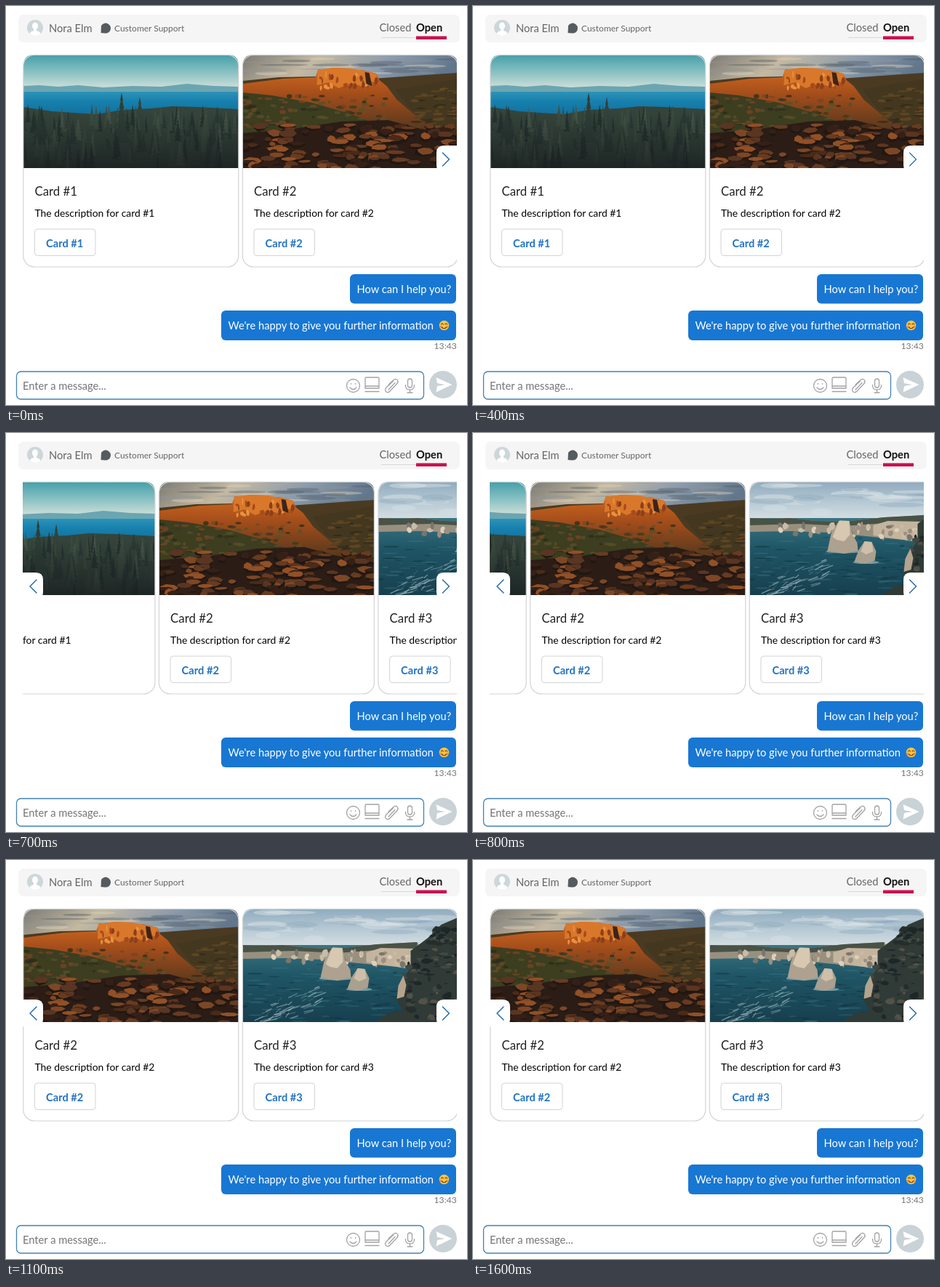
An HTML page that plays this animation: 634 px wide and 549 px high, repeating every 1700 ms.

```html
<!DOCTYPE html>
<html lang="en">
<head>
<meta charset="utf-8">
<title>Chat carousel</title>
<style>
  html, body { margin: 0; width: 100%; height: 100%; overflow: hidden; background: #fff; }
  svg { display: block; width: 634px; height: 549px; font: 14.7px Lato, sans-serif; }
  .line { fill: none; stroke-linecap: round; stroke-linejoin: round; }
  .icons { stroke: #a3a3a3; stroke-width: 1.3; }
  .bold { font-weight: 700; }
</style>
</head>
<body>
<svg viewBox="0 0 634 549">
  <defs>
    <clipPath id="view"><rect x="23" y="60" width="597" height="305"/></clipPath>
    <clipPath id="photo"><path d="M0 156V15Q0 0 15 0H281Q296 0 296 15V156Z"/></clipPath>
    <clipPath id="face"><circle cx="40" cy="30" r="11"/></clipPath>
    <linearGradient id="sky1" x2="0" y2="1"><stop stop-color="#459fa9"/><stop offset=".55" stop-color="#8cc3c4"/><stop offset="1" stop-color="#cfdfd8"/></linearGradient>
    <linearGradient id="lake" x2="0" y2="1"><stop stop-color="#2c93b8"/><stop offset=".4" stop-color="#1780ad"/><stop offset="1" stop-color="#126f9b"/></linearGradient>
    <linearGradient id="shade" x2="0" y2="1"><stop stop-color="#161d1e" stop-opacity="0"/><stop offset="1" stop-color="#161b1d" stop-opacity=".75"/></linearGradient>
    <linearGradient id="sky2" x2="1" y2=".2"><stop stop-color="#7b7972"/><stop offset=".35" stop-color="#c4b9a2"/><stop offset=".7" stop-color="#8a9aab"/><stop offset="1" stop-color="#62778c"/></linearGradient>
    <linearGradient id="mesa" x2="0" y2="1"><stop stop-color="#d0691f"/><stop offset=".4" stop-color="#a34d1b"/><stop offset="1" stop-color="#4c351d"/></linearGradient>
    <linearGradient id="sky3" x2="0" y2="1"><stop stop-color="#8fabbf"/><stop offset=".6" stop-color="#bccdd7"/><stop offset="1" stop-color="#d9e1e3"/></linearGradient>
    <linearGradient id="sea" x2="0" y2="1"><stop stop-color="#3a7583"/><stop offset=".4" stop-color="#1f5565"/><stop offset="1" stop-color="#173f4e"/></linearGradient>
  </defs>

  <rect x="17" y="12" width="607" height="38" rx="7" fill="#f5f5f5"/>
  <circle cx="40" cy="30" r="11" fill="#cdd7da"/>
  <g fill="#fff" clip-path="url(#face)"><ellipse cx="40" cy="27.5" rx="4" ry="5"/><path d="M31 42Q32 35 38 34V30H42V34Q48 35 49 42Z"/></g>
  <text x="59" y="36" fill="#666">Nora Elm</text>
  <path d="M130.500 37L131 27A7 7 0 1 1 136 37.500Z" fill="#555b5e"/>
  <text x="149" y="35" font-size="12" fill="#666">Customer Support</text>
  <text x="513.500" y="35" fill="#666">Closed</text>
  <path d="M516 43.500H564" stroke="#d8d8d8"/>
  <text class="bold" x="564" y="34.500" fill="#111">Open</text>
  <rect x="564" y="41.500" width="42" height="4.500" fill="#c9114d"/>

  <g clip-path="url(#view)">
    <g id="strip"></g>
    <g id="prev">
      <path d="M22 192H41Q51 192 51 202V219Q51 229 41 229H22Z" fill="#fff"/>
      <path class="line" d="M42 202L33 211L42 220" stroke="#286ca8" stroke-width="1.5"/>
    </g>
    <path d="M621 192H602Q592 192 592 202V219Q592 229 602 229H621Z" fill="#fff"/>
    <path id="next" class="line" d="M600.500 202L609.500 211L600.500 220" stroke="#286ca8"/>
  </g>

  <g fill="#1877d2"><rect x="473" y="369" width="146" height="40.500" rx="6"/><rect x="296" y="419" width="323" height="41" rx="6"/></g>
  <g fill="#fff"><text x="482.500" y="395">How can I help you?</text><text x="305.500" y="445">We're happy to give you further information</text></g>
  <circle cx="602.500" cy="439.500" r="6.800" fill="#f8c440"/>
  <g fill="#ee8a55"><circle cx="598" cy="441.500" r="1.800"/><circle cx="607" cy="441.500" r="1.800"/></g>
  <path class="line" d="M598.500 438Q600 435.500 601.300 438M604 438Q605.500 435.500 606.800 438M599.500 442Q602.500 445.500 605.500 442" stroke="#70401d" stroke-width="1.200"/>
  <text x="588.500" y="472" font-size="12.200" fill="#777">13:43</text>

  <rect x="14.500" y="503" width="560" height="38" rx="6" fill="#fff" stroke="#4382b4" stroke-width="1.300"/>
  <text x="23" y="527.500" fill="#757575">Enter a message...</text>
  <g class="line icons">
    <circle cx="477.500" cy="522.500" r="9"/>
    <path d="M474.500 519.500v.8M480.500 519.500v.8M473 525Q477.500 530 482 525"/>
    <path d="M495.500 511H511.500Q513 511 513 512.500V526H494V512.500Q494 511 495.500 511ZM494 523H513M494 530.500H513"/>
    <path d="M526 521L533 514.500Q536.500 512 538.500 515Q540 517.500 537.500 520L528 530Q525 533 522.500 530.500Q520.500 528 523 525L532.500 516M526 528L535 518.500"/>
    <rect x="552.500" y="513" width="6" height="12" rx="3"/>
    <path d="M549.500 521.500V523Q550 528 555.500 528Q561 528 561.500 523V521.500M555.500 528V532M552 532H559"/>
  </g>
  <circle cx="601" cy="521" r="19" fill="#c9d2d6"/>
  <path d="M591.500 511L613.500 521L591.500 531.500L593 523L604 521L593 519Z" fill="#fff"/>
</svg>
<script>
let seed = 11;
const rand = (min, max) => {
  seed = seed * 16807 % 2147483647;
  return min + (max - min) * seed / 2147483647;
};
const pick = list => list[Math.floor(rand(0, list.length))];
const repeat = (n, make) => Array.from({ length: n }, (_, i) => make(i)).join('');
const poly = (points, fill, more = '') => `<polygon points="${points}" fill="${fill}" ${more}/>`;
const box = (y, h, fill) => `<rect y="${y}" width="296" height="${h}" fill="${fill}"/>`;
const blob = (x, y, rx, ry, fill, opacity) =>
  `<ellipse cx="${x}" cy="${y}" rx="${rx}" ry="${ry}" fill="${fill}" opacity="${opacity}"/>`;

function tree(x, y, w, h, fill) {
  const points = [[x, y]];
  for (let i = 1; i <= 6; i++) {
    const reach = w * i / 6 * rand(.8, 1.2), level = y + h * i / 6;
    points.push([x + reach, level], [x + reach * .45, level - 1]);
    points.unshift([x - reach * .45, level - 1], [x - reach, level]);
  }
  return poly(points.map(p => p.map(n => n.toFixed(1))).join(' '), fill);
}

function rock(x, y, w, h, fill) {
  const points = repeat(7, i => {
    const a = i / 7 * Math.PI * 2, r = rand(.7, 1.1);
    return `${(x + Math.cos(a) * w * r).toFixed(1)},${(y + Math.sin(a) * h * r).toFixed(1)} `;
  });
  return poly(points, fill);
}

const forest = () => {
  const greens = ['#33443a', '#3c4c40', '#2b3934', '#465448', '#25322f'];
  return box(0, 46, 'url(#sky1)')
    + poly('0,52 0,43 22,42 48,44 75,42 110,45 150,43 190,44 225,40 262,43 296,44 296,52', '#6ba5b1')
    + box(51, 33, 'url(#lake)')
    + poly('0,72 40,78 100,82 135,76 175,74 205,71 240,72 296,75 296,156 0,156', '#35443b')
    + repeat(75, () => tree(rand(0, 296), rand(68, 86), rand(3, 6), rand(22, 34), pick(greens)))
    + tree(135, 52, 13, 70, '#2e3e37') + tree(160, 58, 13, 68, '#33423a') + tree(22, 70, 11, 55, '#2c3a34')
    + repeat(95, i => tree(rand(0, 296), 84 + i * .5 + rand(-5, 5), rand(4, 8), rand(26, 45), pick(greens)))
    + box(80, 76, 'url(#shade)');
};

const canyon = () => {
  const browns = ['#683b20', '#4a2a19', '#7d4725', '#352017', '#593522', '#925026'];
  return box(0, 45, 'url(#sky2)')
    + repeat(22, () => blob(rand(0, 296), rand(0, 26), rand(12, 35), rand(1, 3), pick(['#56616c', '#ddd0b7', '#8e9296']), .45))
    + poly('0,36 50,31 100,30 180,33 235,29 296,25 296,156 0,156', '#4b3a22')
    + poly('0,40 55,33 100,31 104,20 118,21 124,18 150,19 158,23 164,21 184,26 188,35 198,43 212,62 238,84 262,104 190,110 80,90 0,65', 'url(#mesa)')
    + poly('103,21 124,18 150,19 184,26 186,40 175,36 165,44 150,39 132,46 118,38 102,42', '#d9782a')
    + repeat(24, () => rock(rand(106, 184), rand(27, 48), rand(1, 4), rand(2, 6), pick(['#a84a1b', '#ea9140', '#8b3f1b'])))
    + poly('168,24 174,25 178,43 170,40', '#3d2419')
    + poly('0,52 40,56 95,66 150,82 205,104 210,125 0,130', '#3d3d20')
    + poly('210,48 296,33 296,112 265,104 230,74', '#44371f')
    + repeat(110, () => blob(rand(0, 200), rand(56, 100), rand(2, 6), rand(1, 3), pick(['#2a2d18', '#57512a', '#764425', '#393a1f']), .75))
    + repeat(50, () => blob(rand(235, 296), rand(44, 100), rand(3, 9), rand(1, 2), pick(['#2d2818', '#5c4824', '#6d4c25']), .7))
    + poly('0,108 70,102 135,92 200,90 245,102 296,108 296,156 0,156', '#2b1d16')
    + repeat(115, i => {
      const y = 96 + i * .54, x = rand(0, 296), w = rand(6, 17), h = rand(3, 8);
      return rock(x, y + 2, w, h, '#211712') + rock(x, y, w * .9, h * .75, pick(browns));
    });
};

const coast = () => {
  const cream = ['#c9bba6', '#9b8f80', '#ddd0ba', '#79766e'];
  return box(0, 54, 'url(#sky3)')
    + repeat(28, () => blob(rand(0, 270), rand(4, 42), rand(12, 38), rand(2, 5), pick(['#e6eaec', '#d6e0e6', '#8da8ba']), .4))
    + box(50, 106, 'url(#sea)')
    + poly('0,50 30,51 55,50 90,54 130,55 185,49 240,46 250,60 235,82 190,78 110,70 55,68 0,69', '#98907f')
    + poly('0,50 30,51 55,50 90,54 130,55 185,49 240,46 240,57 185,57 130,61 70,58 0,60', '#495247')
    + repeat(38, () => rock(rand(30, 235), rand(60, 72), rand(2, 5), rand(3, 7), pick(cream)))
    + poly('170,60 190,54 238,55 235,84 212,80 170,74', '#c5b49d')
    + repeat(18, () => rock(rand(174, 234), rand(60, 78), rand(2, 5), rand(2, 6), pick(cream)))
    + repeat(130, () => blob(rand(0, 225), rand(76, 156), rand(3, 13), rand(.4, 1.2), pick(['#37717e', '#123441', '#28606e']), .55))
    + repeat(55, () => {
      const x = rand(15, 100), y = 160 - x * .35 + rand(-16, 14);
      return `<path d="M${x} ${y}l${rand(4, 18)} ${rand(-7, -2)}" stroke="#a9c1c6" stroke-width="${rand(.4, 1.3)}" opacity=".65"/>`;
    })
    + blob(130, 96, 25, 2.5, '#9fbabd', .7) + blob(160, 111, 18, 2, '#9fbabd', .7)
    + poly('107,95 112,72 120,58 124,53 137,54 141,72 148,84 149,95 130,99', '#aea18f')
    + poly('123,54 137,54 138,73 130,82 120,80 114,76', '#d6c8b1')
    + poly('144,110 150,94 158,82 168,83 174,96 172,109 158,113', '#aaa08f')
    + poly('158,82 168,83 170,96 160,100 153,96', '#cdbfaa')
    + poly('231,58 255,40 273,22 296,12 296,156 182,156 200,144 220,140 211,124 215,105 224,91 231,82', '#303a36')
    + repeat(105, () => {
      const y = rand(28, 152);
      return rock(rand(y < 75 ? 272 - y * .4 : 222, 296), y, rand(2, 9), rand(1, 5), pick(['#252e2d', '#414841', '#1e2728', '#535148']));
    })
    + poly('212,124 214,106 221,92 225,105 222,121', '#b4a48d');
};

const pitch = 301.5;
const card = (photo, i) => {
  const name = `Card #${i + 1}`;
  return `<g transform="translate(${24 + i * pitch} 67)">
    <g clip-path="url(#photo)">${photo()}</g>
    <rect x="-.2" y=".3" width="296" height="291.700" rx="15.500" fill="none" stroke="#d2d4d6" stroke-width="1.200"/>
    <text x="15.500" y="194" font-size="16.800" fill="#222">${name}</text>
    <text x="15.500" y="223" font-size="13.900">The description for card #${i + 1}</text>
    <rect x="15.500" y="240" width="83.500" height="36.500" rx="4" fill="#fff" stroke="#d0d3d6"/>
    <text class="bold" x="31" y="265" fill="#2474c2">${name}</text></g>`;
};

const [strip, prev, next] = ['strip', 'prev', 'next'].map(id => document.getElementById(id));
strip.innerHTML = [forest, canyon, coast].map(card).join('');

// Ease-in-out, cubic-bezier(.42, 0, .58, 1), solved by bisection
function ease(x) {
  let low = 0, high = 1;
  for (let i = 0; i < 24; i++) {
    const u = (low + high) / 2;
    if (1.26 * u - .78 * u * u + .52 * u ** 3 < x) low = u; else high = u;
  }
  return low * low * (3 - 2 * low);
}

const loop = 1700, tick = 100, scrollStart = 543, scrollTime = 365;

function draw() {
  const time = Math.floor(performance.now() % loop / tick) * tick;
  const progress = Math.min(1, Math.max(0, (time - scrollStart) / scrollTime));
  strip.setAttribute('transform', `translate(${-pitch * ease(progress)} 0)`);
  prev.setAttribute('visibility', progress > 0 ? 'visible' : 'hidden');
  next.setAttribute('stroke-width', time > 300 && time < 600 ? 1.15 : 1.5);
  requestAnimationFrame(draw);
}
draw();
</script>
</body>
</html>
```
